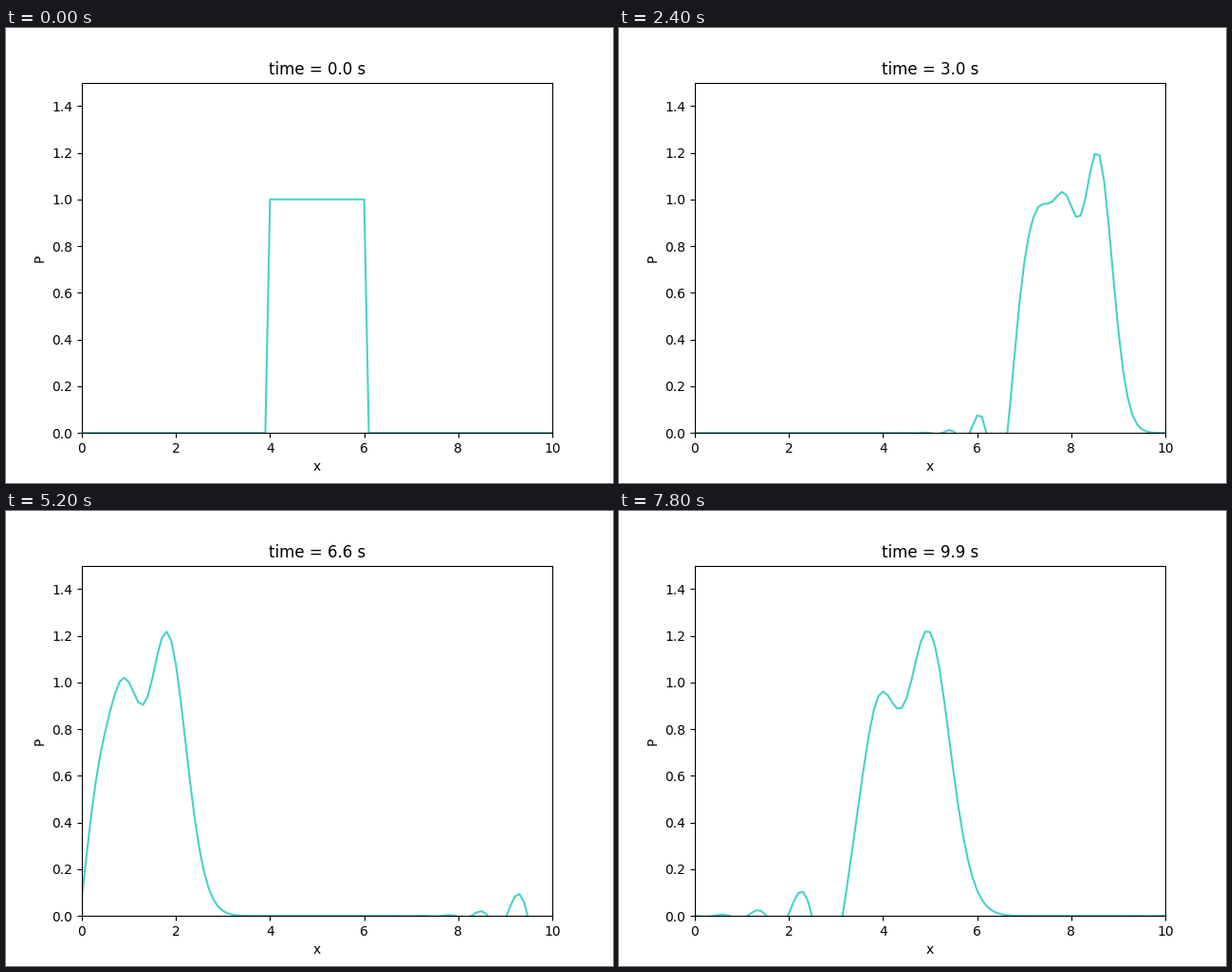
A matplotlib script that plays this animation: 640 by 480 pixels, repeating every 8000 ms.

```python
import numpy as np
import matplotlib.pyplot as plt
from matplotlib.animation import FuncAnimation

FRAMES = 40
INTERVAL = 200        # ms
STEPS = 5             # solver steps per frame
COURANT = 0.5
TIMES = np.linspace(0, 20, 80)


def lax_wendroff(p, c):
    """Advance p one step on a periodic grid."""
    left, right = np.roll(p, 1), np.roll(p, -1)
    return p - c / 2 * (right - left) + c**2 / 2 * (right - 2 * p + left)


def solve(p):
    states = [p]
    for _ in range(FRAMES - 1):
        for _ in range(STEPS):
            p = lax_wendroff(p, COURANT)
        states.append(p)
    return states


x = np.linspace(0, 10, 101)
pulse = np.where(np.abs(x - 5) < 1.05, 1.0, 0.0)
states = solve(pulse)

fig, ax = plt.subplots(figsize=(6.4, 4.8), dpi=100)
line, = ax.plot(x, pulse, color="mediumturquoise", lw=1.5)
ax.set(xlim=(0, 10), ylim=(0, 1.5), xlabel="x", ylabel="P")
title = ax.set_title("time = 0.0 s")


def update(i):
    line.set_ydata(states[i])
    title.set_text(f"time = {TIMES[i]:.1f} s")
    return line, title


anim = FuncAnimation(fig, update, frames=FRAMES, interval=INTERVAL,
                     repeat=True, repeat_delay=0, blit=False)
plt.show()
```
